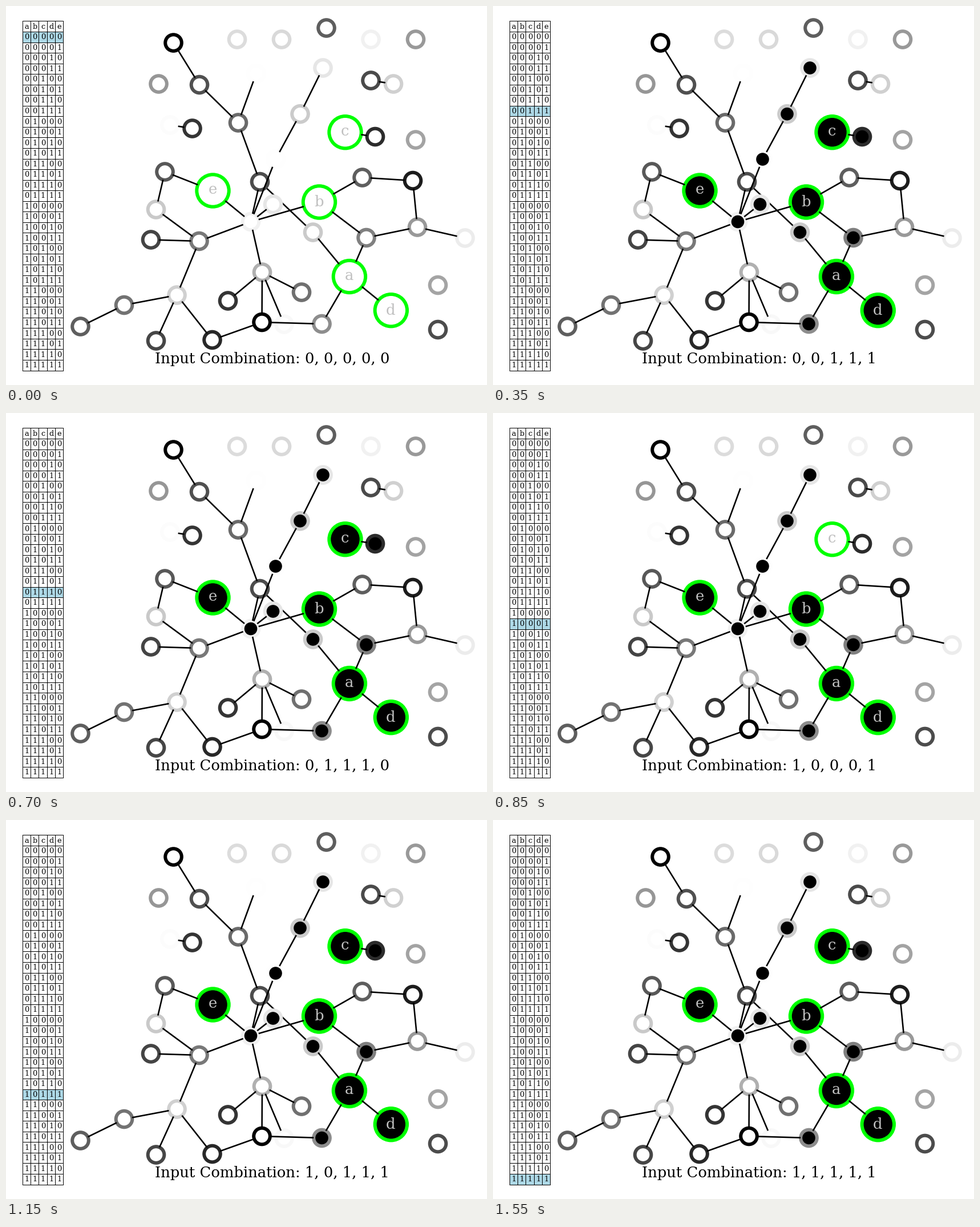
These frames come from a looping animation (843x664 px, 1600 ms). A matplotlib script:

```python
from itertools import product
from math import hypot

import matplotlib.pyplot as plt
from matplotlib.animation import FuncAnimation
from matplotlib.patches import Circle, Rectangle

W, H, DPI = 843, 664, 72
LIME, LABEL = "#00ff00", "#c0c0c0"
SMALL, BIG, PEN = 14.3, 28.2, 6
plt.rcParams["font.family"] = "DejaVu Serif"

# Nodes are x, y and ring grey level.
INPUTS = {"a": (601.4, 473.5), "b": (548.5, 343), "c": (594, 220.7),
          "d": (674.3, 532.7), "e": (362, 323)}
LINKED = {
    "A": (293, 64, 0), "B": (338.5, 137.5, 80), "C": (406.5, 204, 106),
    "D": (438, 118, 254), "E": (444.5, 307.5, 76), "F": (537.5, 396, 202),
    "G": (428.5, 377.5, 241), "H": (467.5, 347, 230), "I": (472, 268, 254),
    "J": (515, 188.7, 203), "K": (555, 108, 230), "L": (639, 130, 74),
    "M": (678.5, 136, 208), "N": (287, 208, 252), "O": (326, 214, 52),
    "P": (646.5, 228.5, 44), "Q": (278, 290, 88), "R": (262.5, 356, 201),
    "S": (338, 411.5, 120), "T": (253.5, 409, 68), "U": (299, 506, 208),
    "V": (206.5, 523.5, 114), "W": (130, 561, 94), "X": (262.5, 586, 70),
    "Y": (361, 584.5, 40), "Z": (448, 553.5, 0), "f": (448.5, 466, 176),
    "g": (388.5, 516, 52), "h": (517.5, 501, 112), "i": (487, 557, 248),
    "j": (553, 556.5, 141), "k": (624, 300, 94), "l": (712.5, 305.5, 28),
    "m": (720.5, 387, 153), "n": (804, 406, 236), "o": (631, 405.5, 128),
}
LONERS = [(404.5, 58, 220), (482.5, 58, 217), (561, 38, 94),
          (639, 58, 241), (717.5, 58, 153), (267, 136, 150),
          (717.5, 234, 163), (756.5, 488.5, 164), (756.5, 566.5, 76)]
EDGES = ("AB BC CD CE EG EF Fa GH GI IJ JK GS Gf Ge Gb LM NO Pc eQ QR RS "
         "ST SU UV VW UX UY YZ Zf fg fh fi Zj ja ad ao ob bk kl lm mo mn").split()

links = {name: set() for name in [*INPUTS, *LINKED]}
for p, q in EDGES:
    links[p].add(q)
    links[q].add(p)

# Darker rings need a larger share of active neighbours.
threshold = {name: 1 - grey / 255 for name, (_, _, grey) in LINKED.items()}
threshold.update(dict.fromkeys(INPUTS, 0.25))


def cascade(bits):
    """Spread activity from the set inputs until nothing changes."""
    active = {name for name, bit in zip(INPUTS, bits) if bit}
    while True:
        new = {n for n in links if n not in active
               and len(links[n] & active) / len(links[n]) >= threshold[n]}
        if not new:
            return active
        active |= new


combos = list(product((0, 1), repeat=5))
states = [cascade(bits) for bits in combos]

fig = plt.figure(figsize=(W / DPI, H / DPI), dpi=DPI, facecolor="white")
ax = fig.add_axes([0, 0, 1, 1])
# Whole numbers fall on pixel centres.
ax.set_xlim(-0.5, W - 0.5)
ax.set_ylim(H - 0.5, -0.5)
ax.axis("off")

# Truth table
LEFT, TOP, COL, ROW = 29, 26.4, 14.2, 18.55
BOTTOM, RIGHT = round(TOP + 33 * ROW), round(LEFT + 5 * COL)


def rule(xs, ys):
    ax.plot(xs, ys, color="black", lw=1, snap=False)


marker = ax.add_patch(Rectangle((LEFT, TOP + ROW), 5 * COL, ROW, snap=False,
                                fc="lightblue", ec="none", zorder=0))
for r in range(34):
    rule([LEFT, RIGHT], [round(TOP + r * ROW)] * 2)
for c in range(6):
    rule([round(LEFT + c * COL)] * 2, [round(TOP), BOTTOM])
for r, cells in enumerate([tuple("abcde"), *combos]):
    for c, cell in enumerate(cells):
        ax.text(LEFT + (c + 0.5) * COL, TOP + (r + 0.5) * ROW + 3.4, str(cell),
                size=13, ha="center", va="baseline")


# Network
def ring(x, y, radius, color):
    return ax.add_patch(Circle((x, y), radius, fc="white", ec=color, lw=PEN, zorder=3))


def join(p, q):
    """Draw an edge between the middles of two rings' outlines."""
    (x0, y0), (x1, y1) = spots[p], spots[q]
    length = hypot(x1 - x0, y1 - y0)
    start, end = (BIG if n in INPUTS else SMALL for n in (p, q))
    ts = start / length, 1 - end / length
    # One edge runs behind the node it crosses.
    ax.plot([x0 + t * (x1 - x0) for t in ts], [y0 + t * (y1 - y0) for t in ts],
            color="black", lw=2.6, solid_capstyle="butt",
            zorder=2 if p + q == "EF" else 4)


spots = {**INPUTS, **{name: node[:2] for name, node in LINKED.items()}}
for x, y, grey in LONERS:
    ring(x, y, SMALL, str(grey / 255))
discs = {name: ring(x, y, SMALL, str(grey / 255))
         for name, (x, y, grey) in LINKED.items()}
for name, (x, y) in INPUTS.items():
    discs[name] = ring(x, y, BIG, LIME)
    drop = 8 if name in "bd" else 6
    ax.text(x - 0.5, y + drop, name, size=25.9, color=LABEL,
            ha="center", va="baseline", zorder=5)
for p, q in EDGES:
    join(p, q)

caption = ax.text(260.3, 625.5, "", size=25.9, va="baseline", zorder=5)


def draw(step):
    marker.set_y(TOP + (step + 1) * ROW)
    caption.set_text("Input Combination: " + ", ".join(map(str, combos[step])))
    for name, disc in discs.items():
        disc.set_facecolor("black" if name in states[step] else "white")
    return [marker, caption, *discs.values()]


anim = FuncAnimation(fig, draw, frames=len(combos), interval=50,
                     init_func=lambda: draw(0), repeat=True, repeat_delay=0)
plt.show()
```
